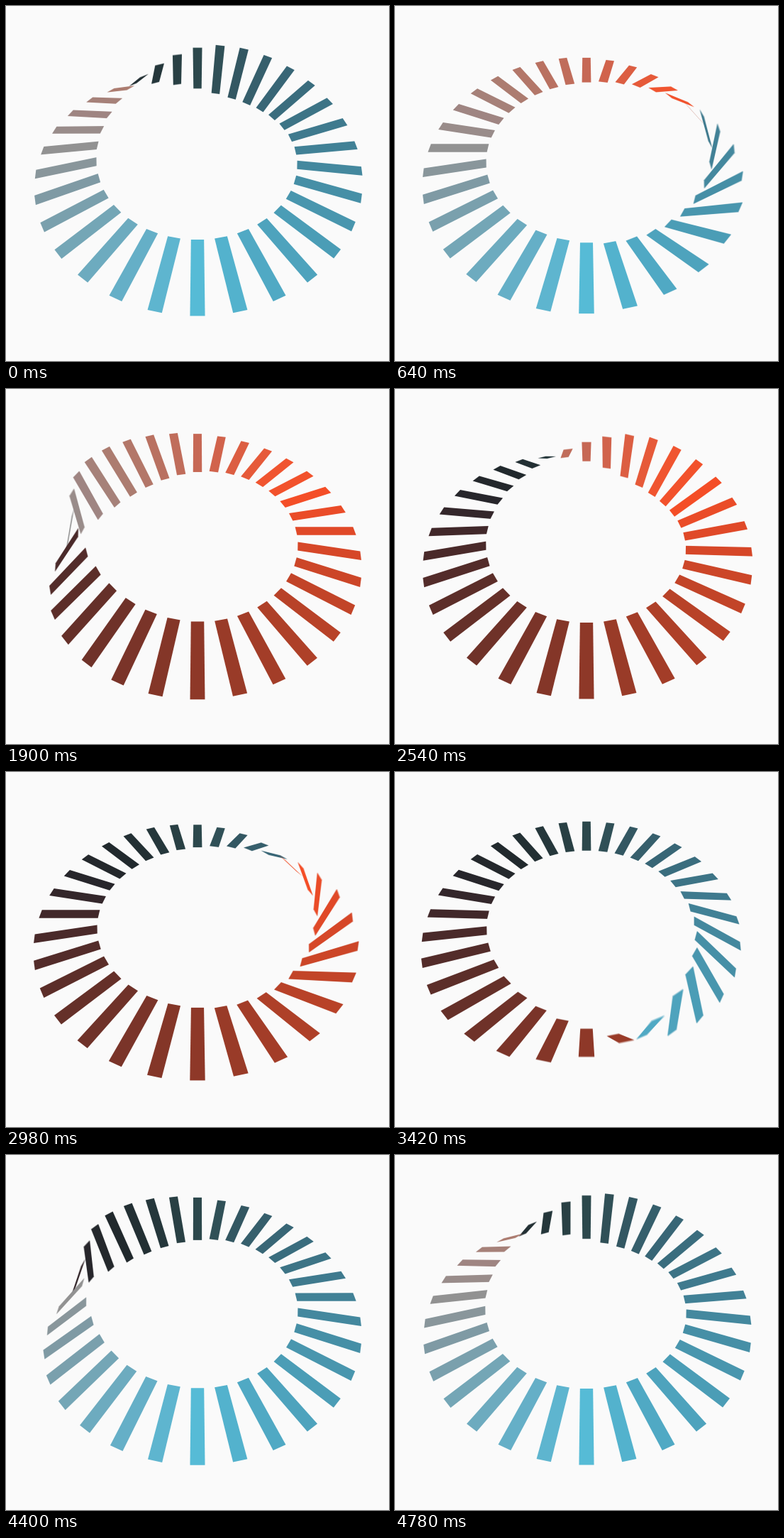
These frames come from a looping animation (540 by 500 pixels, 4800 ms). An HTML page with a canvas:

```html
<!DOCTYPE html>
<html lang="en">
<head>
<meta charset="utf-8">
<title>Flipping ring</title>
<style>
html, body { margin: 0; width: 100%; height: 100%; overflow: hidden; background: #fafafa; }
canvas { display: block; }
</style>
</head>
<body>
<canvas id="stage" width="540" height="500"></canvas>
<script>
const W = 540, H = 500, LOOP = 4800, STEP = 20;
const BARS = 32, RADIUS = 180.2, HALF_LEN = 41.2, HALF_WIDTH = 7.5;
const TILT = 55.5 * Math.PI / 180, SIN = Math.sin(TILT), COS = Math.cos(TILT);
const CAMERA = H / 2 / Math.tan(Math.PI / 6), LIFT = 50;
const SAMPLES = 5, SHUTTER = 12;

// The colour cycle takes two turns of the ring: [place, colour].
const STOPS = [
  [0, '2c484c'], [2, '335762'], [4, '386676'], [8, '418196'], [12, '4b9db6'],
  [14, '50a9c4'], [16, '56bbd6'], [18, '65afc7'], [20, '74a6b6'], [22, '7f9aa4'],
  [24, '929292'], [26, '9f8582'], [28, 'ac7c70'], [30, 'b97161'], [32, 'c66855'],
  [34, 'dc5e42'], [36, 'f05530'], [38, 'f44e27'], [40, 'e04928'], [44, 'b84228'],
  [48, '8e3828'], [52, '653029'], [56, '41282a'], [58, '27262b'], [60, '21292d'],
  [62, '25373b'], [64, '2c484c']
].map(([at, hex]) => [at, [0, 2, 4].map(k => parseInt(hex.slice(k, k + 2), 16))]);

function tint(place) {
  const n = Math.max(1, STOPS.findIndex(s => s[0] >= place));
  const [a, from] = STOPS[n - 1], [b, to] = STOPS[n];
  const k = (place - a) / (b - a);
  return `rgb(${from.map((c, i) => Math.round(c + (to[i] - c) * k))})`;
}

const ease = p => p < 0.5 ? 0.5 * (2 * p) ** 3.5 : 1 - 0.5 * (2 - 2 * p) ** 3.5;

function project(x, y, z) {
  const s = CAMERA / (CAMERA - z * COS - y * SIN);
  return [W / 2 + s * x, H / 2 - s * (y * COS - z * SIN + LIFT)];
}

const bars = Array.from({ length: BARS }, (_, i) => {
  const a = i / BARS * 2 * Math.PI;
  return { i, sin: Math.sin(a), cos: Math.cos(a), front: tint(i), back: tint(i + BARS) };
}).sort((p, q) => q.cos - p.cos);

function corners(bar, t) {
  const p = 2 * t / LOOP - bar.i / BARS + 0.5, turn = Math.floor(p);
  const flip = Math.PI * (turn + ease(p - turn));
  return [[1, -1], [1, 1], [-1, 1], [-1, -1]].map(([end, side]) => {
    const r = RADIUS + end * HALF_LEN * Math.cos(flip);
    const y = end * HALF_LEN * Math.sin(flip);
    const w = side * HALF_WIDTH;
    return project(r * bar.sin + w * bar.cos, y, w * bar.sin - r * bar.cos);
  });
}

function area(pts) {
  return pts.reduce((sum, [x, y], k) => {
    const [nx, ny] = pts[(k + 1) % pts.length];
    return sum + x * ny - nx * y;
  }, 0);
}

const ctx = document.getElementById('stage').getContext('2d');
const layer = document.createElement('canvas');
layer.width = W;
layer.height = H;
const pen = layer.getContext('2d');

function paint(t) {
  pen.fillStyle = '#fafafa';
  pen.fillRect(0, 0, W, H);
  for (const bar of bars) {
    const pts = corners(bar, t);
    pen.fillStyle = area(pts) > 0 ? bar.front : bar.back;
    pen.beginPath();
    pts.forEach(([x, y]) => pen.lineTo(x, y));
    pen.fill();
  }
}

// Average a few moments for a slight motion blur.
function draw(t) {
  for (let k = 0; k < SAMPLES; k++) {
    paint(t + SHUTTER * k / SAMPLES);
    ctx.globalAlpha = 1 / (k + 1);
    ctx.drawImage(layer, 0, 0);
  }
}

let start = null;
function tick(now) {
  if (start === null) start = now;
  const t = (now - start) % LOOP;
  draw(Math.floor(t / STEP) * STEP);
  requestAnimationFrame(tick);
}
draw(0);
requestAnimationFrame(tick);
</script>
</body>
</html>
```
